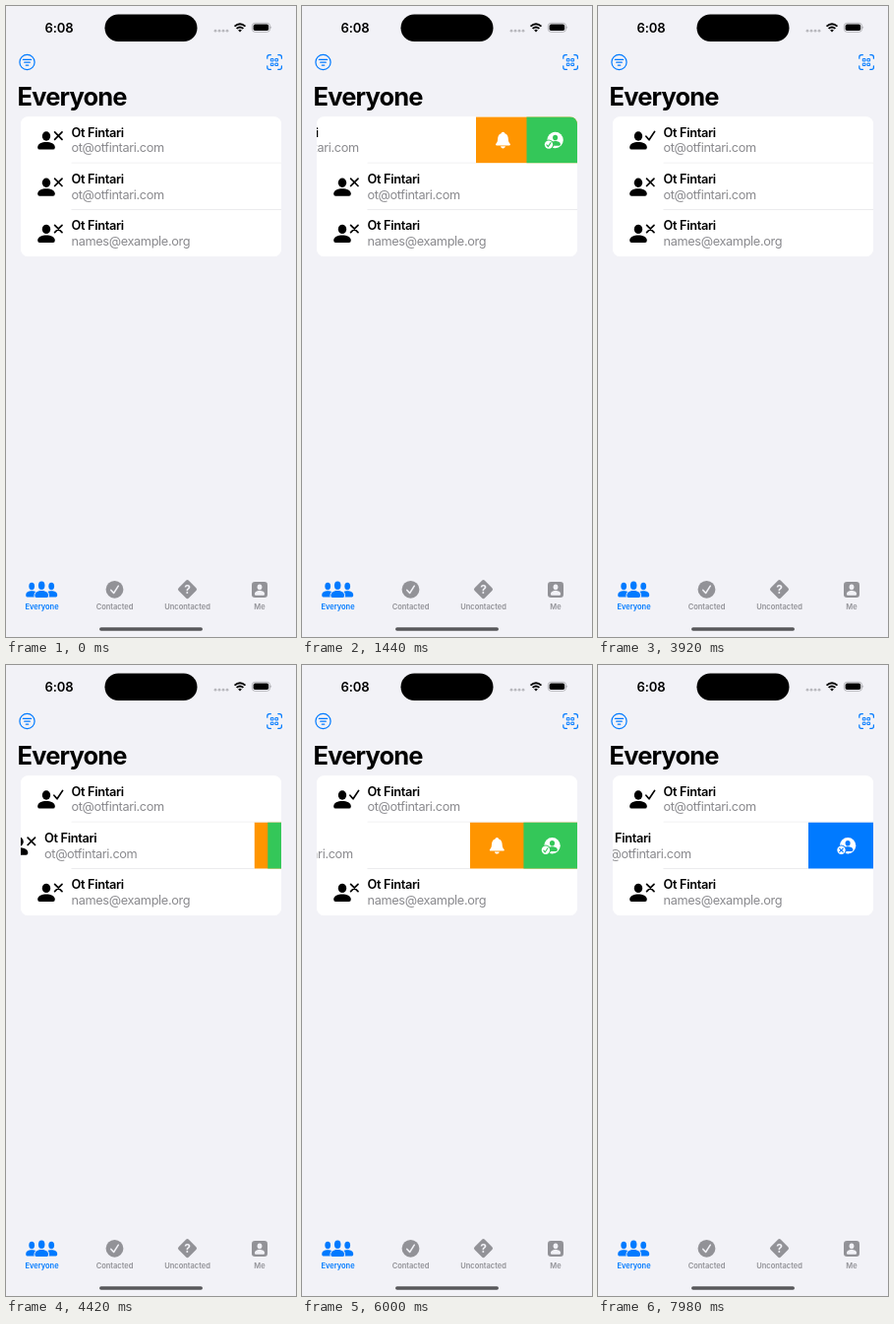
Recreate the animation shown at these times as an HTML page. Size 295x640 px, loop 8 s.

```html
<!DOCTYPE html>
<html lang="en">
<head>
<meta charset="utf-8">
<title>Contact list swipe actions</title>
<style>
  html, body { margin: 0; width: 100%; height: 100%; overflow: hidden; background: #f2f2f7; }
  svg { display: block; width: 295px; height: 640px; }
  text { font-family: Inter, Roboto, sans-serif; }
  .title { font-size: 25.5px; font-weight: 700; letter-spacing: -.85px; }
  .clock { font-size: 13.1px; font-weight: 600; letter-spacing: -.2px; text-anchor: middle; }
  .name { font-size: 12.75px; font-weight: 600; letter-spacing: -.32px; }
  .mail { font-size: 12.75px; fill: #8a8a8e; letter-spacing: -.36px; }
  .tab { font-size: 7.5px; font-weight: 600; text-anchor: middle; }
  .line { fill: none; stroke-linecap: round; stroke-linejoin: round; }
</style>
</head>
<body>
<svg viewBox="0 0 295 640" xmlns="http://www.w3.org/2000/svg">
  <defs>
    <clipPath id="card"><rect x="15" y="112.3" width="265" height="141.6" rx="7.5"/></clipPath>
    <clipPath id="cell"><rect x="15" width="265" height="47.2"/></clipPath>
    <g id="person">
      <ellipse cx="0" cy="-4.8" rx="4.2" ry="4.7"/>
      <path d="M-8.8 6.6C-8.8 2.8-4.6 1.2 0 1.2S8.8 2.8 8.8 6.6Q8.8 8.8 6.8 8.8H-6.8Q-8.8 8.8-8.8 6.6Z"/>
    </g>
    <path id="bell" d="M0-8.3C1.2-8.3 1.7-7.5 1.8-6.8C4.5-6 5.3-3.8 5.4-.8C5.5 1.8 6.3 2.7 7.2 3.8C7.8 4.6 7.4 5.4 6.4 5.4H-6.4C-7.4 5.4-7.8 4.6-7.2 3.8C-6.3 2.7-5.5 1.8-5.4-.8C-5.3-3.8-4.5-6-1.8-6.8C-1.7-7.5-1.2-8.3 0-8.3ZM-2.4 6.3H2.4C2 9.1-2 9.1-2.4 6.3Z"/>
  </defs>
  <rect width="295" height="640" fill="#f2f2f7"/>

  <text class="clock" x="54" y="26.7">6:08</text>
  <rect x="100.5" y="8.5" width="94" height="27.5" rx="13.75"/>
  <g fill="#b9b9be">
    <circle cx="213" cy="25.2" r="1.4"/><circle cx="217" cy="25.2" r="1.4"/>
    <circle cx="221" cy="25.2" r="1.4"/><circle cx="225" cy="25.2" r="1.4"/>
  </g>
  <path d="M232.5 20.6Q238 15.7 243.5 20.6M234.6 22.9Q238 19.9 241.4 22.9" fill="none" stroke="#000" stroke-width="1.9"/>
  <path d="M238 26.6L236.1 24.6Q238 23 239.9 24.6Z"/>
  <rect x="250.3" y="17.3" width="18.2" height="9" rx="3" fill="none" stroke="#a5a5a9" stroke-width=".8"/>
  <rect x="251.6" y="18.6" width="15.6" height="6.4" rx="1.8"/>
  <path d="M269.4 20.3Q271 21.8 269.4 23.3Z" fill="#a5a5a9"/>

  <g class="line" stroke="#007aff" stroke-width="1.2">
    <circle cx="21.5" cy="57" r="7.6"/>
    <path d="M17.3 54.3H25.7M18.7 57.2H24.3M20.2 60.1H22.8"/>
    <path d="M265.8 53.2V51.7Q265.8 49.6 267.9 49.6H269.4M276.8 49.6H278.3Q280.4 49.6 280.4 51.7V53.2M280.4 60.8V62.3Q280.4 64.4 278.3 64.4H276.8M269.4 64.4H267.9Q265.8 64.4 265.8 62.3V60.8"/>
    <path d="M269.7 53.6H272V55.9H269.7ZM274.3 53.6H276.6V55.9H274.3ZM269.7 58.2H272V60.5H269.7ZM274.3 58.2H276.6V60.5H274.3Z" stroke-width="1"/>
  </g>
  <text class="title" x="11.6" y="101">Everyone</text>

  <g clip-path="url(#card)">
    <rect x="15" y="112" width="265" height="143" fill="#fff"/>
    <g id="rows"></g>
  </g>

  <g fill="#007aff">
    <use href="#person" transform="translate(26.2 592.4) scale(.68 .8)"/>
    <use href="#person" transform="translate(46.2 592.4) scale(.68 .8)"/>
    <use href="#person" transform="translate(36.2 592) scale(.78 .9)" stroke="#f2f2f7" stroke-width="2.4" paint-order="stroke"/>
    <text class="tab" x="36.5" y="612">Everyone</text>
  </g>
  <g fill="#929297">
    <circle cx="110.5" cy="591.8" r="8.9"/>
    <path class="line" d="M106.8 592.4L109.6 595.5L114.3 588.2" stroke="#f2f2f7" stroke-width="1.5"/>
    <rect x="177.2" y="584.4" width="14.6" height="14.6" rx="2" transform="rotate(45 184.5 591.7)"/>
    <text x="184.5" y="596" fill="#f2f2f7" font-size="12" font-weight="700" text-anchor="middle">?</text>
    <rect x="250" y="584" width="16" height="16" rx="3.2"/>
    <use href="#person" transform="translate(258 592.3) scale(.57 .62)" fill="#f2f2f7"/>
    <text class="tab" x="110.5" y="612">Contacted</text>
    <text class="tab" x="184.5" y="612">Uncontacted</text>
    <text class="tab" x="258" y="612">Me</text>
  </g>
  <rect x="95" y="630.2" width="105" height="3.6" rx="1.8" fill="#58585b"/>
</svg>

<script>
const LOOP = 8000, ROW = 47.2, TOP = 112.3, RIGHT = 280, HALF_BUTTON = 27.5;
const CROSS = 'M-3.7-3.7L3.7 3.7M3.7-3.7L-3.7 3.7';
const CHECK = 'M-4.4 .6L-1.3 4.2L4.3-4.2';

const people = [
  ['Ot Fintari', 'ot@otfintari.com'],
  ['Ot Fintari', 'ot@otfintari.com'],
  ['Ot Fintari', 'names@example.org']
];

// Finger drag as [ms, offset]; "tap" closes the row and marks it contacted.
const swipes = [
  { row: 0, tap: 2440, drag: [[500, 0], [720, -14], [930, -40], [1150, -72], [1300, -92], [1440, -103], [1650, -109.5], [2030, -111]] },
  { row: 1, tap: 5980, drag: [[3920, 0], [4200, -12], [4500, -33], [4800, -62], [5070, -88], [5300, -103], [5550, -110], [5880, -111]] },
  { row: 1, tap: Infinity, single: true, drag: [[7330, 0], [7550, -14], [7760, -38], [7980, -66]] }
];

const badge = (color, mark) => `
  <circle cx="1.6" r="8.2" fill="#fff"/>
  <use href="#person" transform="translate(1.6 .4) scale(.6)" fill="${color}"/>
  <circle cx="-5" cy="4.6" r="5.2" fill="${color}"/>
  <circle cx="-5" cy="4.6" r="4.2" fill="#fff"/>
  <path class="line" d="${mark}" transform="translate(-5 4.6) scale(.48)" stroke="${color}" stroke-width="2.2"/>`;

const button = (id, color, icon) => `
  <g class="${id}"><rect width="140" height="${ROW}" fill="${color}"/>
    <g class="icon" transform="translate(${HALF_BUTTON} 23.7)">${icon}</g></g>`;

document.getElementById('rows').innerHTML = people.map(([name, mail], i) => `
  <g class="row" transform="translate(0 ${TOP + i * ROW})" clip-path="url(#cell)">
    ${button('remind', '#ff9500', '<use href="#bell" fill="#fff"/>')}
    ${button('done', '#34c759', badge('#34c759', CHECK))}
    ${button('undo', '#007aff', badge('#007aff', CROSS))}
    <g class="content">
      <rect x="-140" width="${RIGHT + 140}" height="${ROW}" fill="#fff"/>
      <use href="#person" transform="translate(41 24.5)"/>
      <path class="line mark" transform="translate(53.3 19.3)" stroke="#000" stroke-width="1.7"/>
      <text class="name" x="66.5" y="20.7">${name}</text>
      <text class="mail" x="66.5" y="36.1">${mail}</text>
    </g>
    ${i < 2 ? `<rect class="rule" x="66.5" y="46.6" height=".6" fill="#cfcfd3"/>` : ''}
  </g>`).join('');

const rows = [...document.querySelectorAll('.row')].map(el => {
  const part = name => el.querySelector('.' + name);
  return {
    content: part('content'), mark: part('mark'), rule: part('rule'),
    remind: part('remind'), done: part('done'), undo: part('undo'),
    undoIcon: el.querySelector('.undo .icon')
  };
});

function along(points, t) {
  const next = points.findIndex(p => p[0] > t);
  if (next === 0) return points[0][1];
  if (next < 0) return points[points.length - 1][1];
  const [t0, a] = points[next - 1], [t1, b] = points[next];
  return a + (b - a) * (t - t0) / (t1 - t0);
}

function swipeOffset({ drag, tap }, t) {
  if (t < tap) return along(drag, t);
  if (t > tap + 1000) return 0;
  const w = (t - tap) * .0092;
  return drag[drag.length - 1][1] * (1 + w) * Math.exp(-w);
}

const moveX = (el, x, y = 0) => el.setAttribute('transform', `translate(${x} ${y})`);

function draw(t) {
  rows.forEach((row, i) => {
    const own = swipes.filter(s => s.row === i);
    const active = own.filter(s => t >= s.drag[0][0]).pop();
    const offset = active ? swipeOffset(active, t) : 0;
    const single = Boolean(active && active.single);
    const edge = RIGHT + offset;
    moveX(row.content, offset);
    moveX(row.remind, edge);
    moveX(row.done, RIGHT + offset / 2);
    moveX(row.undo, edge);
    moveX(row.undoIcon, Math.max(HALF_BUTTON, -offset - HALF_BUTTON), 23.7);
    row.remind.style.display = row.done.style.display = single ? 'none' : '';
    row.undo.style.display = single ? '' : 'none';
    row.mark.setAttribute('d', own.some(s => t >= s.tap) ? CHECK : CROSS);
    if (row.rule) row.rule.setAttribute('width', edge - 66.5);
  });
}

const start = performance.now();
function tick() {
  draw((performance.now() - start) % LOOP);
  requestAnimationFrame(tick);
}
tick();
</script>
</body>
</html>
```
